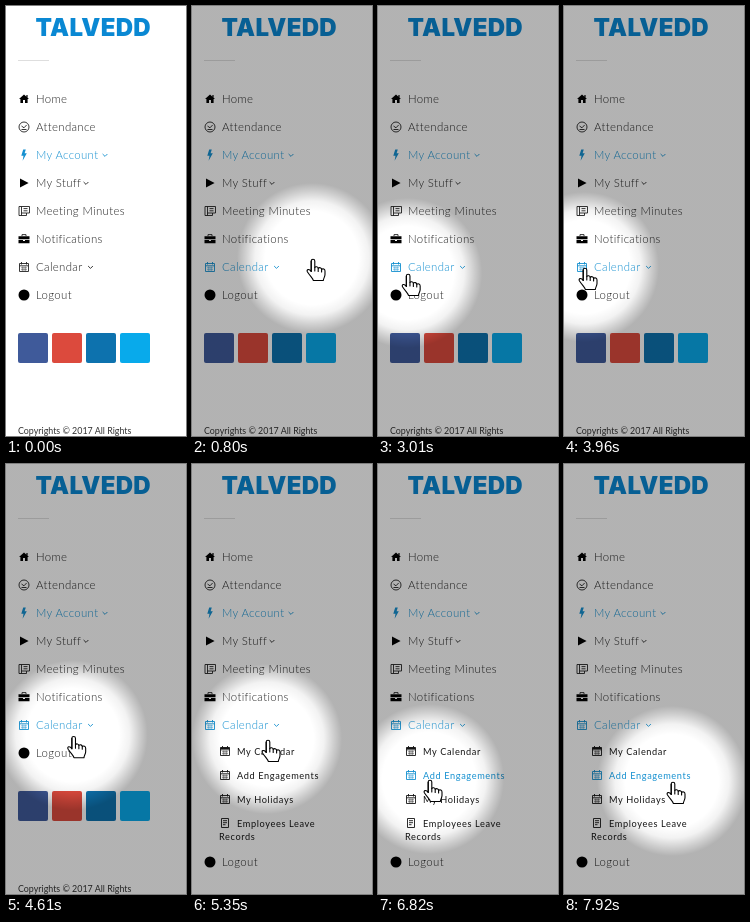
These frames come from a looping animation (180 px wide and 430 px high, 8 s). An HTML page:

```html
<!DOCTYPE html>
<html lang="en">
<head>
<meta charset="utf-8">
<title>Sidebar menu</title>
<style>
  html, body { margin: 0; width: 100%; height: 100%; overflow: hidden; background: #fff; }
  svg { display: block; }
  text { font-family: Lato, "Open Sans", sans-serif; fill: currentColor; }
  .item { font-size: 11.4px; font-weight: 300; letter-spacing: .35px; }
  .sub { font-size: 9.2px; letter-spacing: .62px; }
  .foot { font-size: 8.9px; color: #333; }
  .brand { font: 900 24px Inter, sans-serif; letter-spacing: .3px; fill: #0a88d3; }
  .row { color: #222; }
  .sub { color: #151515; }
  .row.on, .sub.on { color: #1590d0; }
  .line { fill: none; stroke: currentColor; stroke-width: .9; }
  .thin { stroke-width: .5; }
  .solid { fill: #000; }
</style>
</head>
<body>
<svg width="180" height="430" viewBox="0 0 180 430">
  <defs>
    <radialGradient id="glow" gradientUnits="userSpaceOnUse" r="75">
      <stop offset=".62" stop-color="#000" stop-opacity="0"/>
      <stop offset=".76" stop-color="#000" stop-opacity=".05"/>
      <stop offset=".9" stop-color="#000" stop-opacity=".2"/>
      <stop offset="1" stop-color="#000" stop-opacity=".3"/>
    </radialGradient>
    <clipPath id="fold"><rect id="foldBox" y="274" width="180" height="0"/></clipPath>
  </defs>
  <rect width="180" height="430" fill="#fff"/>
  <text class="brand" x="29.5" y="30">TALVEDD</text>
  <path d="M12 54.5H43" stroke="#dedede"/>
  <g id="menu"></g>
  <g id="subs" clip-path="url(#fold)"></g>
  <g id="tail"></g>
  <rect id="shade" width="180" height="430" fill="url(#glow)"/>
  <g id="hand" stroke="#000" stroke-width="1.1" stroke-linejoin="round" stroke-linecap="round">
    <path fill="#fff" d="M-1.8 1.5C-1.8-.8 1.8-.8 1.8 1.5V8C2.5 6.8 5 7 5.2 8.8C6.3 7.6 8.4 8 8.6 9.8C10 8.8 12 9.6 12 11.5V15C12 17.5 10.5 18.5 10.3 21H.3C0 19-2.5 17-5.5 12.5C-7 10-4 8.8-1.8 12Z"/>
    <path fill="none" d="M-1.8 12V1.5M1.8 8V11.5M5.2 8.8V12M8.6 9.8V12.5"/>
  </g>
</svg>
<script>
const LOOP = 8000, STEP = 132, FOLD = 109;
const $ = id => document.getElementById(id);

// Icons are drawn around their own centre.
const calendar = '<path class="line" d="M-4.5-3.5H4.5V4.5H-4.5ZM-4.5-1.2H4.5M-2.5-5V-2.5M2.5-5V-2.5"/>' +
  '<path class="line thin" d="M-3 .8H3M-3 2.7H3M-1.2-.5V4M1.2-.5V4"/>';
const icons = {
  home: '<path class="solid" d="M0-4.6L5 0H3.6V4H1V1H-1V4H-3.6V0H-5ZM2.4-4H3.6V-1H2.4Z"/>',
  clock: '<circle class="line" r="5"/><path class="line" d="M-2.5-1L0 .8L2.6-2M-2.5 2.5H2.5"/>',
  bolt: '<path fill="currentColor" d="M-.8-5.5H1.8L.6-1.8H2.8L-1.4 5.8L-.5.8H-2.7Z"/>',
  play: '<path class="solid" d="M-4-4.6L4.6 0L-4 4.6Z"/>',
  notes: '<path class="line" d="M-5-4.5H5.5V2H2.5V4.5H-5ZM-2.5-4.5V4.5M-2.5 2H2.5M-.5-2.4H3.5M-.5-.2H3.5"/>',
  bag: '<path class="solid" d="M-5.5-2.8H5.5V.2H-5.5ZM-5.5 1H-1V2H1V1H5.5V4.2H-5.5Z"/><path class="line" stroke-width="1.2" d="M-2-3V-4.4H2V-3"/>',
  calendar,
  month: calendar + '<path fill="currentColor" d="M-4.5-3.6H4.5V-2H-4.5Z"/>',
  page: '<path class="line" d="M-3.5-4.5H3.5V4.5H-3.5ZM-2-2.3H2M-2-.3H2M-2 1.7H.5"/>',
  dot: '<circle class="solid" r="5.5"/>'
};
const icon = (name, x, y) => `<g transform="translate(${x} ${y})">${icons[name]}</g>`;
const chevron = (x, y) => `<path class="line" d="M${x - 2.4} ${y - 1}l2.4 2.4l2.4-2.4"/>`;

function row([label, name, arrow], i) {
  const y = 93 + 28 * i;
  return `<g class="row ${name === 'bolt' ? 'on' : ''}" id="${name}">${icon(name, 18, y)}` +
    `<text class="item" x="30" y="${y + 4}">${label}</text>${arrow ? chevron(arrow, y) : ''}</g>`;
}
function sub([label, name, rest = ''], i) {
  const y = 287 + 24 * i;
  return `<g class="sub">${icon(name, 33, y)}<text x="45" y="${y + 4}">${label}</text>` +
    `<text x="27" y="${y + 17}">${rest}</text></g>`;
}
const tile = (fill, i) =>
  `<rect x="${12 + 34 * i}" y="327" width="30" height="30" rx="2" fill="${fill}"/>`;

$('menu').innerHTML = [
  ['Home', 'home'], ['Attendance', 'clock'], ['My Account', 'bolt', 99], ['My Stuff', 'play', 80],
  ['Meeting Minutes', 'notes'], ['Notifications', 'bag'], ['Calendar', 'calendar', 84.5]
].map(row).join('');
$('subs').innerHTML = [
  ['My Calendar', 'month'], ['Add Engagements', 'calendar'],
  ['My Holidays', 'calendar'], ['Employees Leave', 'page', 'Records']
].map(sub).join('');
$('tail').innerHTML = row(['Logout', 'dot'], 7) +
  ['#3f5a9a', '#dc4a3d', '#0d72ae', '#08aaeb'].map(tile).join('') +
  '<text class="foot" x="12" y="428">Copyrights © 2017 All Rights</text>';
const subRows = [...$('subs').children];

// The pointer eases from stop to stop.
const stops = [
  { t: 528, x: 165, y: 232 }, { t: 790, x: 120, y: 252 },
  { t: 1200, x: 62, y: 257 }, { t: 1500, x: 62, y: 257 },
  { t: 1850, x: 89, y: 257 }, { t: 2240, x: 89, y: 257 },
  { t: 2840, x: 26, y: 267 }, { t: 3300, x: 86, y: 266 },
  { t: 3960, x: 20, y: 261 }, { t: 4660, x: 75, y: 273 },
  { t: 5300, x: 75, y: 275 }, { t: 5900, x: 115, y: 309 },
  { t: 6700, x: 51, y: 315 }, { t: 7260, x: 51, y: 315 },
  { t: 7920, x: 108, y: 317 }
];
const ramp = (t, a, b) => Math.min(1, Math.max(0, (t - a) / (b - a)));
const ease = k => k * k * (3 - 2 * k);

function pointer(t) {
  const i = Math.max(1, stops.findIndex(s => s.t >= t));
  const a = stops[i - 1], b = stops[i], k = ease(ramp(t, a.t, b.t));
  return [a.x + (b.x - a.x) * k, a.y + (b.y - a.y) * k];
}

function draw(now) {
  // The screen refreshes at a fixed low rate.
  const t = Math.floor(now / STEP) * STEP;
  const [x, y] = pointer(t);
  const seen = t >= stops[0].t, open = ramp(t, 4890, 5120);

  $('shade').setAttribute('opacity', ramp(t, 400, 790));
  $('glow').setAttribute('cx', x);
  $('glow').setAttribute('cy', y);
  $('hand').setAttribute('transform', `translate(${x + 1} ${y + 1.5})`);
  $('hand').setAttribute('visibility', seen ? 'visible' : 'hidden');
  if (!seen) $('shade').setAttribute('opacity', 0);

  $('foldBox').setAttribute('height', FOLD * open);
  $('tail').setAttribute('transform', `translate(0 ${FOLD * open})`);
  $('calendar').classList.toggle('on', seen && (open > 0 || y > 247));
  subRows.forEach((el, i) =>
    el.classList.toggle('on', open === 1 && Math.floor((y - 278) / 24) === i));
}

function loop() {
  draw(performance.now() % LOOP);
  requestAnimationFrame(loop);
}
loop();
</script>
</body>
</html>
```
